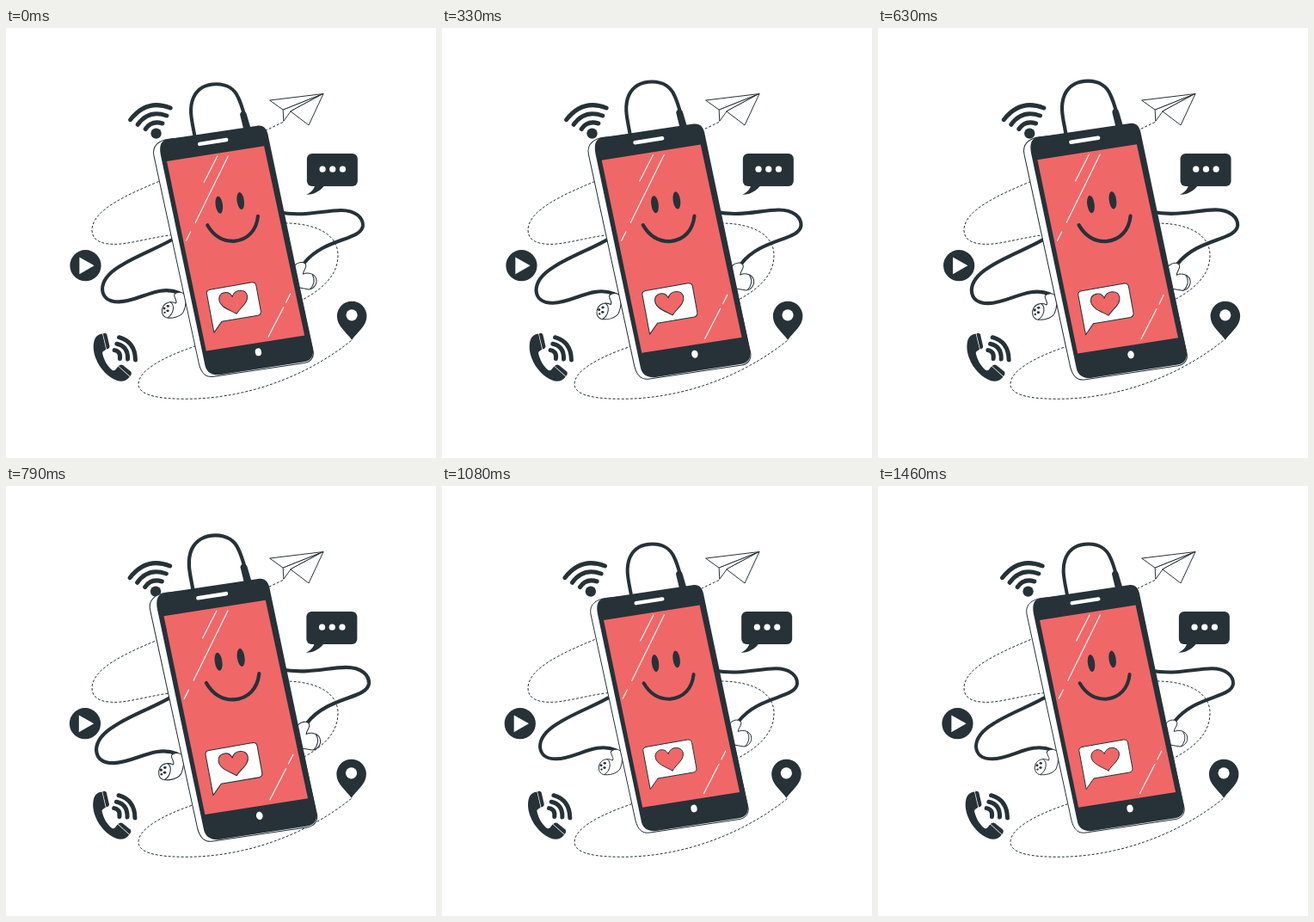
Animation of 500x500 px, one loop 1500 ms. Source, as an HTML page:

```html
<!DOCTYPE html>
<html lang="en">
<head>
<meta charset="utf-8">
<title>Happy phone</title>
<style>
  html, body { margin: 0; width: 100%; height: 100%; overflow: hidden; background: #fff; }
  svg { display: block; width: 100%; height: 100%; }
  .ink { fill: #263238; }
  .red { fill: #f06768; }
  .white { fill: #fff; }
  .hair { stroke: #263238; stroke-width: 1; stroke-linejoin: round; stroke-linecap: round; }
  .line { fill: none; stroke: #263238; stroke-linecap: round; stroke-linejoin: round; }
  .cord { stroke-width: 4; }
  .wave { stroke-width: 5; }
  .shine { fill: none; stroke: #fff; stroke-width: 1.1; stroke-linecap: round; }
  .dash { fill: none; stroke: #263238; stroke-width: 1; stroke-dasharray: 3 2; }
</style>
</head>
<body>
<svg viewBox="0 0 500 500">
  <!-- flight trail -->
  <path class="dash" d="M322 109.5 L180 177.5 C140 194 100 212 100 235 C100 250 117 252.5 134 251 C152 249 170 243.5 190 241 C250 231 290 224 327 227 C366 228 386 243 386 264 C386 285 372 299 355 310 C310 338 260 355 217 371 C180 384 154 399 154 414 C154 428 180 431.3 210 431.3 C280 431 350 405 402 363"/>

  <!-- paper plane -->
  <g class="white hair">
    <path d="M307 84 L369 76.5 L322.5 95 Z"/>
    <path d="M322.5 95 L369 76.5 L331 97 L323 108 Z"/>
    <path d="M369 76.5 L352 113 L331 97 Z"/>
  </g>

  <g id="icons">
    <!-- wifi -->
    <g class="line wave">
      <path d="M144.7 106.7 Q164 82 191.3 93"/>
      <path d="M153.3 112.3 Q166 94.5 187 102"/>
      <path d="M162.3 117.5 Q169.5 107 182 111"/>
    </g>
    <circle class="ink" cx="174.7" cy="122.6" r="6.2"/>

    <!-- play -->
    <circle class="ink" cx="92.6" cy="276.2" r="18.1"/>
    <path class="white" d="M85.5 266.5 L102.8 276.3 L85.5 286.2 Z"/>

    <!-- chat -->
    <rect class="ink" x="350" y="146" width="59" height="38" rx="6"/>
    <path class="ink" d="M359.5 182 C359 187 355 191 349.5 193.8 C358 194.2 365.5 189.5 371.5 182 Z"/>
    <g class="white">
      <circle cx="368.2" cy="164.2" r="3.6"/>
      <circle cx="379.9" cy="164.2" r="3.6"/>
      <circle cx="391.6" cy="164.2" r="3.6"/>
    </g>

    <!-- map pin -->
    <path class="ink" d="M402.3 362.8 C396.5 354 385 347 385 335 A17.3 17.3 0 0 1 419.6 335 C419.6 347 408 354 402.3 362.8 Z"/>
    <circle class="white" cx="402.2" cy="333.8" r="6.6"/>

    <!-- handset -->
    <g class="ink">
      <path d="M112.2 355.6 C107.5 356.3 104.5 358.5 103 362.5 C101 369 101.7 377 104.5 384 C109 396 119 406.5 130 410.3 C136 411.8 141 409.5 143.9 405.4 L130.6 393.6 C128 395.5 127.5 399.5 124 398 C118 393.5 114 386 112.3 378.5 C112 375.5 114.5 375.5 116.5 373.7 Z"/>
      <path d="M112.9 355.4 Q116.3 353.8 117.5 356.5 L120.6 370 Q120.8 372.8 117.2 373.5 Z"/>
      <path d="M131 393.1 Q133.5 390.6 136 392 L145.3 399.5 Q147 402 144.4 404.9 Z"/>
    </g>
    <g class="line wave">
      <path d="M126.3 374.6 Q133.8 376 132.6 384.5"/>
      <path d="M129 367.2 Q142.3 370 141.7 385"/>
      <path d="M131.7 359.7 Q150.3 365 150.6 386"/>
    </g>
  </g>

  <g id="phone">
    <!-- cable loop and plug -->
    <path class="line cord" d="M220 127 C217.5 112 212.5 97 218.5 83 C223.5 72 234 67.5 245 67.5 C257 67.5 266 73.5 270 83 C273 89 275 96 277 103"/>
    <path class="ink" d="M272 102.5 Q272.3 99 275.5 98.8 Q278.6 98.8 279.6 102 L284 117 L276 119 Z"/>

    <!-- earphones -->
    <path class="line cord" d="M199 243 C180 255 153 264 134 276.5 C121 284.5 114 293 114 303 C114.5 312 121 317.5 133 317.3 C156 317 178 297 202 307"/>
    <path class="line cord" d="M316 214.5 C346 220 366 212.5 388 212.2 C405 212.2 413.4 221 413 230 C411 247 368 244 345.5 273"/>
    <g class="white hair">
      <path d="M196.5 309 C199 305.5 206 305 208.5 309.5 C210.5 315 209.5 323 207 329 C203 335 194 336.5 187.5 335.5 C182 333.5 181 327 184 322 C187 317.5 193 316.5 198.3 319 C200.5 316 196 313 196.5 309 Z"/>
      <path d="M192 317.5 C197.5 321 196 331 189 335.5" fill="none"/>
      <path d="M332 280 C337 270 346.5 270.5 347.8 275.5 C348 279 344.5 281.5 344.3 285.5 C350 282.8 358 285 359.5 291 C361 297 356.5 302.5 351 303 L334 300 Z"/>
      <path d="M355 286.3 C358.5 291.5 357 298.5 352.5 302.5" fill="none"/>
    </g>
    <g class="ink">
      <ellipse cx="189.3" cy="322.3" rx="1.7" ry="1.4"/>
      <ellipse cx="185" cy="324.8" rx="1.5" ry="1.5"/>
      <ellipse cx="189" cy="327.6" rx="1.7" ry="1.4"/>
      <ellipse cx="185.5" cy="329.6" rx="1.3" ry="1.1"/>
    </g>

    <!-- body -->
    <path class="white hair" d="M190 130.5 C179 132 170.5 138 173.2 150 L225 389 C228 400 233 404.5 242 403 L346 387.5 C354 386 357 380 356 374 L300 120 Z"/>
    <path class="ink" d="M189 130.5 L291.5 115.2 C298.5 114 302.5 118 304 125 L355.5 371 C357 379 353.5 385 345.5 386.3 L249 401 C241 402 234 399 232 391 L181 149 C179 138 181 132 189 130.5 Z"/>
    <path class="red" d="M188 156 L299.6 138.5 L346.1 356 L233.2 373.7 Z"/>
    <path d="M225.7 136.2 L256.3 131.4" fill="none" stroke="#fff" stroke-width="4.4" stroke-linecap="round"/>
    <ellipse class="white" cx="293" cy="375" rx="3.6" ry="4.4" transform="rotate(-10 293 375)"/>

    <!-- reflections -->
    <path class="shine" d="M246 150 L230.7 180 M258.3 150 L220.7 226.5 M215.3 237 L210.3 247 M322 323.5 L304.5 357.5 M329.8 308 L324.8 318"/>

    <!-- face -->
    <ellipse class="ink" cx="248" cy="206" rx="4.1" ry="10" transform="rotate(-8 248 206)"/>
    <ellipse class="ink" cx="272.6" cy="201.4" rx="4.1" ry="10" transform="rotate(-8 272.6 201.4)"/>
    <path class="line cord" d="M234.6 229.3 C242 242 253 248 265 247.7 C281 246.5 291 235 292.6 219"/>

    <!-- liked message -->
    <path class="white hair" d="M237.5 303.4 L285.5 295 Q289.6 294.5 290.5 298.5 L295.9 328 Q296.3 332 292.5 333 L251 340 L242.2 352.6 L233.8 307.7 Q233.4 304.2 237.5 303.4 Z"/>
    <path class="red hair" d="M268 331 C260 326.5 249 323.5 248 315 C247.5 306 259 303.5 263.2 311.5 C265.5 302.5 278 302 280.2 310 C282 318.5 272.5 323.5 268 331 Z"/>
  </g>
</svg>
<script>
  const LOOP = 1500, STEPS = 36;
  const icons = document.getElementById("icons");
  const phone = document.getElementById("phone");

  // [percent of loop, value]
  const shake = [[0, 0], [10, -1], [20, 2], [30, -4], [40, 4], [50, -4], [60, 4], [70, -4], [80, 2], [90, -1], [100, 0]];
  const beat = [[0, 1], [10, 1.094], [30, 1], [40, 1], [49.5, 1.108], [60, 1], [100, 1]];

  function sample(keys, p) {
    const i = keys.findIndex(k => k[0] >= p);
    if (i < 1) return keys[0][1];
    const [p0, v0] = keys[i - 1], [p1, v1] = keys[i];
    return v0 + (v1 - v0) * (p - p0) / (p1 - p0);
  }

  function draw(ms) {
    // 24 poses a second, each taken at the middle of its step
    const step = Math.floor((ms % LOOP + 4) / LOOP * STEPS) % STEPS;
    const p = (step + 0.5) / STEPS * 100;
    icons.setAttribute("transform", `translate(${sample(shake, p)} 0)`);
    phone.setAttribute("transform", `translate(263.5 235) scale(${sample(beat, p)}) translate(-263.5 -235)`);
  }

  function tick() {
    draw(performance.now());
    requestAnimationFrame(tick);
  }
  tick();
</script>
</body>
</html>
```
